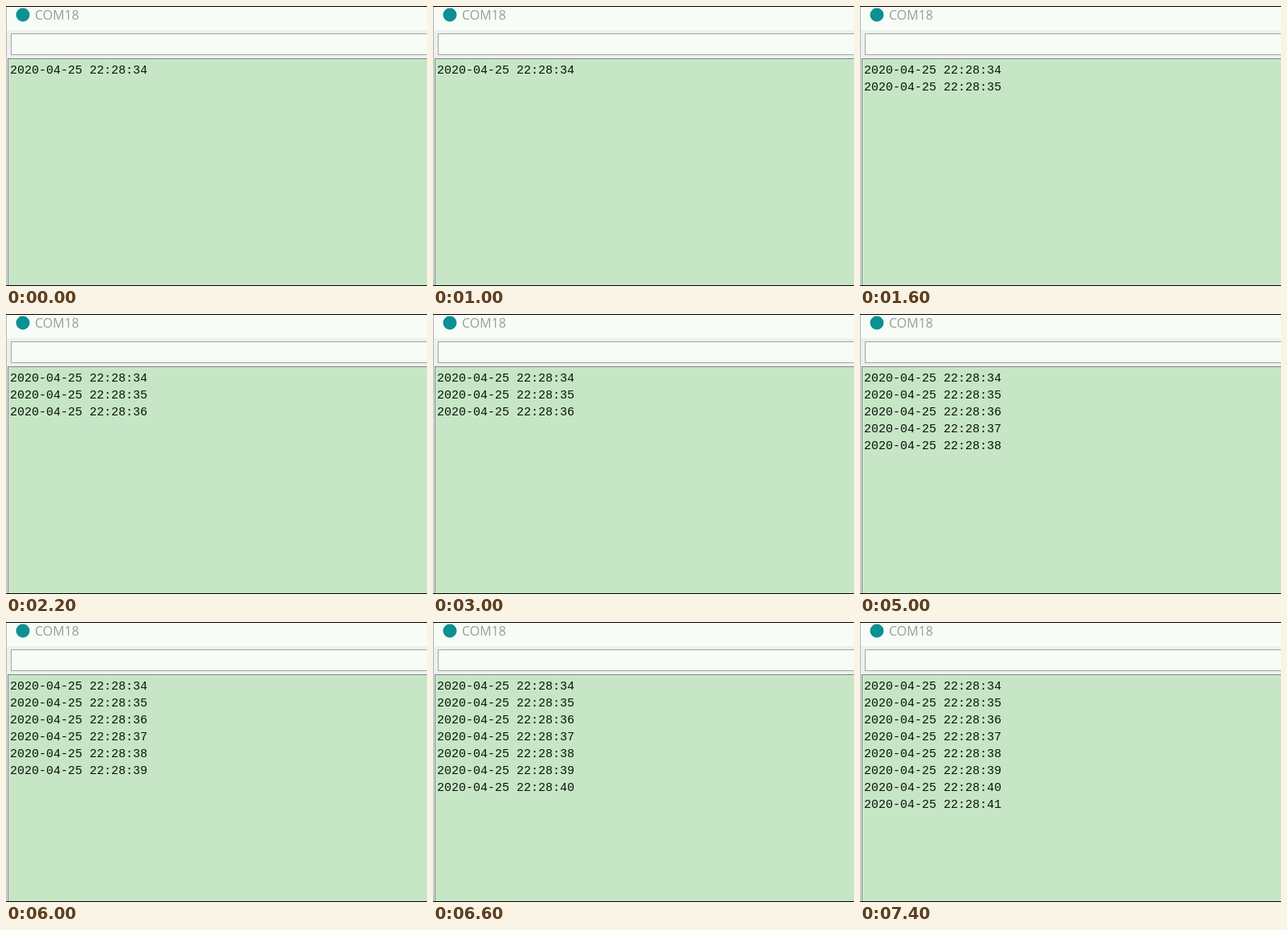
An HTML page that plays this animation: 524x348 px, repeating every 7.6 s.

```html
<!DOCTYPE html>
<html lang="en">
<head>
<meta charset="utf-8">
<title>Serial monitor</title>
<style>
  html, body { margin: 0; width: 100%; height: 100%; overflow: hidden; }
  svg { display: block; }
  .title { font: 16px "Open Sans", sans-serif; fill: #999c9a; }
  .log { font: 15px "Liberation Mono", monospace; fill: #0c140c; }
</style>
</head>
<body>
<svg width="524" height="348">
  <rect width="524" height="348" fill="#eef0ee"/>
  <rect width="524" height="30" fill="#f8fcf7"/>
  <circle cx="21" cy="11" r="8.5" fill="#0b9094"/>
  <text class="title" x="36" y="17">COM18</text>
  <rect x="6.5" y="34.5" width="530" height="26" fill="#f8fcf7" stroke="#a3a6a5"/>
  <rect x="2.5" y="65.5" width="530" height="290" fill="#c7e6c6" stroke="#80868c"/>
  <path d="M.5 0V348" stroke="#b4b6b5"/>
  <path d="M0 .5H524M0 347.5H524" stroke="#000"/>
  <g class="log" id="log"></g>
</svg>
<script>
const LOOP = 7600, PERIOD = 1000, FIRST = 200, LINES = 8;
const log = document.getElementById("log");

for (let i = 0; i < LINES; i++) {
  const line = document.createElementNS("http://www.w3.org/2000/svg", "text");
  line.setAttribute("x", 5);
  line.setAttribute("y", 84 + i * 21);
  line.textContent = `2020-04-25 22:28:${34 + i}`;
  log.append(line);
}

// One more timestamp arrives every second.
function draw() {
  const t = performance.now() % LOOP;
  const shown = 1 + Math.max(0, Math.floor((t - FIRST) / PERIOD));
  [...log.children].forEach((line, i) => {
    line.style.display = i < shown ? "" : "none";
  });
  requestAnimationFrame(draw);
}
draw();
</script>
</body>
</html>
```
